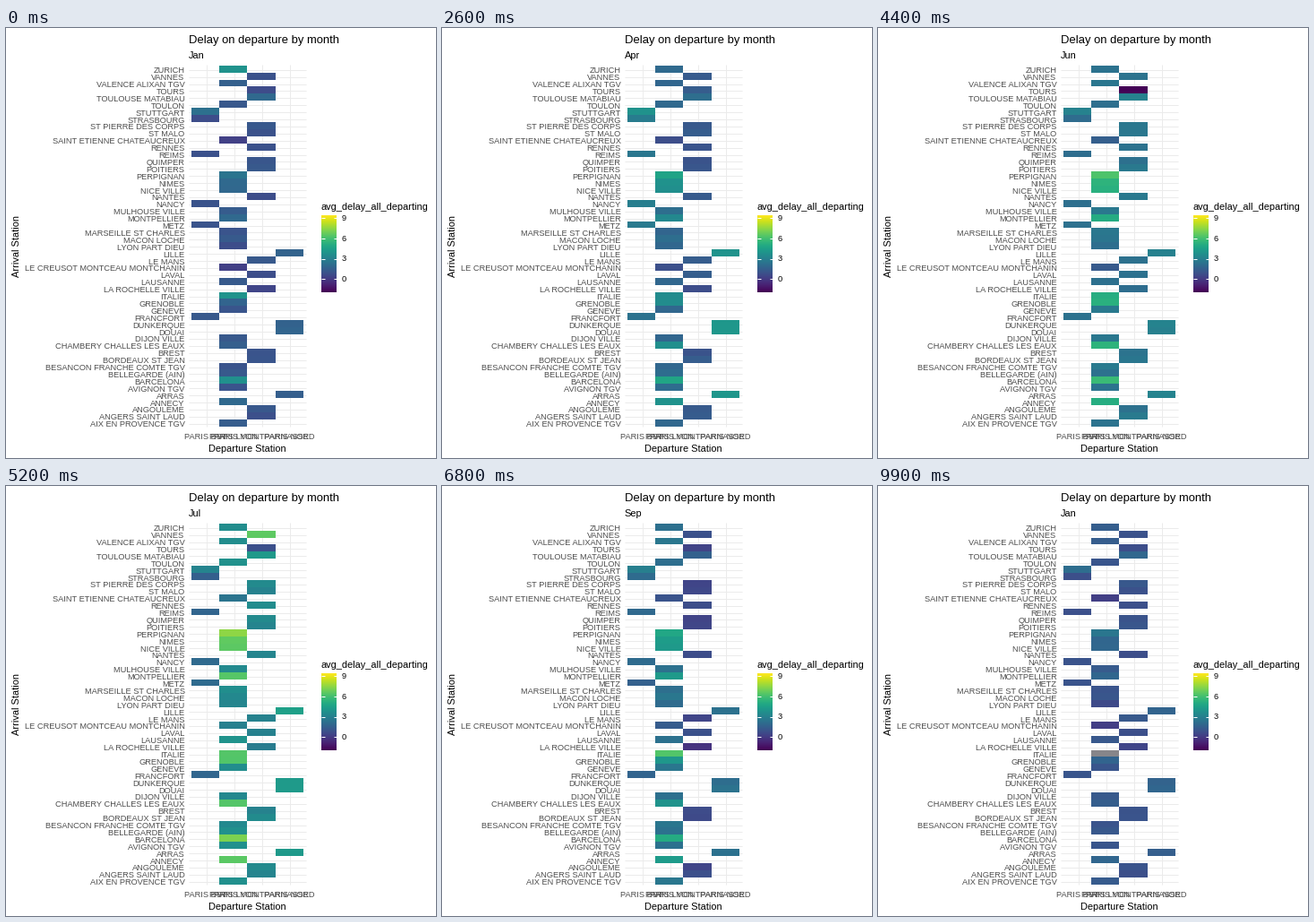
Write a matplotlib script that moves like this. It is 480 px wide and 480 px high and loops after 10000 ms.

```python
import matplotlib.pyplot as plt
import numpy as np
from matplotlib.animation import FuncAnimation
from matplotlib.colors import Normalize
from matplotlib.patches import Rectangle

SIZE, DPI = 480, 72
MONTHS = "Jan Feb Mar Apr May Jun Jul Aug Sep Oct Nov Dec".split()
ORIGINS = ["PARIS EST", "PARIS LYON", "PARIS MONTPARNASSE", "PARIS NORD"]

STATIONS = [
    "ZURICH", "VANNES", "VALENCE ALIXAN TGV", "TOURS", "TOULOUSE MATABIAU",
    "TOULON", "STUTTGART", "STRASBOURG", "ST PIERRE DES CORPS", "ST MALO",
    "SAINT ETIENNE CHATEAUCREUX", "RENNES", "REIMS", "QUIMPER", "POITIERS",
    "PERPIGNAN", "NIMES", "NICE VILLE", "NANTES", "NANCY",
    "MULHOUSE VILLE", "MONTPELLIER", "METZ", "MARSEILLE ST CHARLES",
    "MACON LOCHE", "LYON PART DIEU", "LILLE", "LE MANS",
    "LE CREUSOT MONTCEAU MONTCHANIN", "LAVAL", "LAUSANNE",
    "LA ROCHELLE VILLE", "ITALIE", "GRENOBLE", "GENEVE", "FRANCFORT",
    "DUNKERQUE", "DOUAI", "DIJON VILLE", "CHAMBERY CHALLES LES EAUX",
    "BREST", "BORDEAUX ST JEAN", "BESANCON FRANCHE COMTE TGV",
    "BELLEGARDE (AIN)", "BARCELONA", "AVIGNON TGV", "ARRAS", "ANNECY",
    "ANGOULEME", "ANGERS SAINT LAUD", "AIX EN PROVENCE TGV",
]
REGIONS = {
    "east": {"STUTTGART", "STRASBOURG", "REIMS", "NANCY", "METZ", "FRANCFORT"},
    "west": {
        "VANNES", "TOURS", "TOULOUSE MATABIAU", "ST PIERRE DES CORPS",
        "ST MALO", "RENNES", "QUIMPER", "POITIERS", "NANTES", "LE MANS",
        "LAVAL", "LA ROCHELLE VILLE", "BREST", "BORDEAUX ST JEAN",
        "ANGOULEME", "ANGERS SAINT LAUD"},
    "north": {"LILLE", "DUNKERQUE", "DOUAI", "ARRAS"},
    "south": {
        "PERPIGNAN", "NIMES", "NICE VILLE", "MONTPELLIER", "ITALIE",
        "GRENOBLE", "CHAMBERY CHALLES LES EAUX", "BARCELONA", "ANNECY"},
}
COLUMN = {"east": 0, "centre": 1, "south": 1, "west": 2, "north": 3}

# Seasonal delay in minutes per region, at a few key months
KEY_MONTHS = [0, 1, 3, 5, 6, 8, 11]
SEASON = {
    "east": [.8, 3.7, 2.5, 2, 1.7, 1.6, .6],
    "centre": [1.1, 1.2, 1.9, 2.3, 3.5, 2.2, .9],
    "south": [1.5, 2.1, 3.5, 5, 6.4, 3.9, 1.5],
    "west": [.8, 3.4, 1, 2.3, 3.2, .5, .8],
    "north": [1.5, 4.3, 3.8, 2.8, 4.1, 2.1, 1.6],
}
# Stations that run steadily above or below their region
LEAN = {
    "STUTTGART": 1.1, "TOULOUSE MATABIAU": .9, "PERPIGNAN": .9,
    "BARCELONA": .9, "LA ROCHELLE VILLE": -.6, "LYON PART DIEU": -.5,
    "SAINT ETIENNE CHATEAUCREUX": -1.2, "LE CREUSOT MONTCEAU MONTCHANIN": -.9,
}
# Standout delays
SPIKES = {
    (0, "ZURICH"): 3.7, (0, "ITALIE"): 3.8, (0, "BARCELONA"): 3.6,
    (1, "TOURS"): 6.6, (5, "TOURS"): -2, (6, "TOURS"): .7,
    (6, "VANNES"): 6.5, (8, "ITALIE"): 6.2,
}


def region(name):
    return next((r for r, names in REGIONS.items() if name in names), "centre")


rng = np.random.default_rng(4)
typical = rng.uniform(-.3, .3, (12, len(STATIONS)))
for s, name in enumerate(STATIONS):
    season = np.interp(range(12), KEY_MONTHS, SEASON[region(name)])
    typical[:, s] += season + LEAN.get(name, 0)

# The year closes with no value for Barcelona and an off-scale one for Italy
states = np.vstack([typical, typical[:1]])
states[12, STATIONS.index("BARCELONA")] = np.nan
states[12, STATIONS.index("ITALIE")] = 99
for (m, name), delay in SPIKES.items():
    states[m, STATIONS.index(name)] = delay

START = [0, 8, 17, 26, 35, 44, 52, 60, 68, 76, 84, 92, 100]
FRAMES = 100

LEFT, TOP = 203.9, 40.97
COL, ROW = 31.2, 7.9
RIGHT, BOTTOM = LEFT + 4.2 * COL, TOP + (len(STATIONS) + .2) * ROW
GRID, GREY = "#ebebeb", "#4d4d4d"
SMALL = 9.3
cmap = plt.get_cmap("viridis").copy()
cmap.set_bad(alpha=0)
cmap.set_over("#87868a")
norm = Normalize(-2.05, 9.3)

plt.rcParams["font.family"] = "Liberation Sans"
fig = plt.figure(figsize=(SIZE / DPI, SIZE / DPI), dpi=DPI, facecolor="white")
ax = fig.add_axes([0, 0, 1, 1])
ax.axis("off")


def label(x, y, s, size=11, color="black", **kw):
    return ax.text(x, y, s, size=size, color=color, va="baseline", **kw)


def line(xs, ys, color):
    ax.plot(xs, ys, color=color, lw=1, solid_capstyle="butt", zorder=1)


def hline(x0, x1, y, color=GRID):
    line([x0, x1], [round(y) + .5] * 2, color)


for c, name in enumerate(ORIGINS):
    x = LEFT + (c + .6) * COL
    line([round(x) + .5] * 2, [TOP, BOTTOM], GRID)
    label(x, 459.3, name, SMALL, GREY, ha="center")

tiles = []
for r, name in enumerate(STATIONS):
    y = TOP + (r + .6) * ROW
    hline(LEFT, RIGHT, y)
    label(199.5, y + 4.5, name, SMALL, GREY, ha="right")
    c = COLUMN[region(name)]
    x0, x1 = (round(LEFT + (c + k) * COL) for k in (.1, 1.1))
    y0, y1 = (round(TOP + (r + k) * ROW) for k in (.1, 1.1))
    tile = Rectangle((x0, y0), x1 - x0, y1 - y0, lw=0, antialiased=False, zorder=2)
    tiles.append(ax.add_patch(tile))

label(LEFT, 17, "Delay on departure by month", 13)
month = label(LEFT, 34, "")
label((LEFT + RIGHT) / 2, 473, "Departure Station", ha="center")
label(15, (TOP + BOTTOM) / 2, "Arrival Station", rotation=90, ha="center",
      rotation_mode="anchor")

# Colour bar
label(352, 203, "avg_delay_all_departing")
ramp = np.linspace(norm.vmin, norm.vmax, 256)[:, None]
ax.imshow(ramp, cmap=cmap, norm=norm, origin="lower", aspect="auto",
          extent=(352, 369, 295, 209), zorder=1)
for v in (0, 3, 6, 9):
    y = 295 - 86 * norm(v)
    hline(352, 355.5, y, "white")
    hline(365.5, 369, y, "white")
    label(374.5, y + 3.6, str(v), SMALL)

ax.set_xlim(0, SIZE)
ax.set_ylim(SIZE, 0)


def draw(i):
    m = max(k for k in range(12) if START[k] <= i)
    step = max(0, i - START[m + 1] + 4)
    values = states[m]
    if step:
        values = values + (states[m + 1] - values) * step / 4
    colors = cmap(norm(np.ma.masked_invalid(values)))
    for tile, color in zip(tiles, colors):
        tile.set_facecolor(color)
    month.set_text(MONTHS[(m + (step >= 2)) % 12])
    return tiles + [month]


anim = FuncAnimation(fig, draw, frames=FRAMES, interval=100, repeat=True,
                     repeat_delay=0, blit=False)
plt.show()
```
